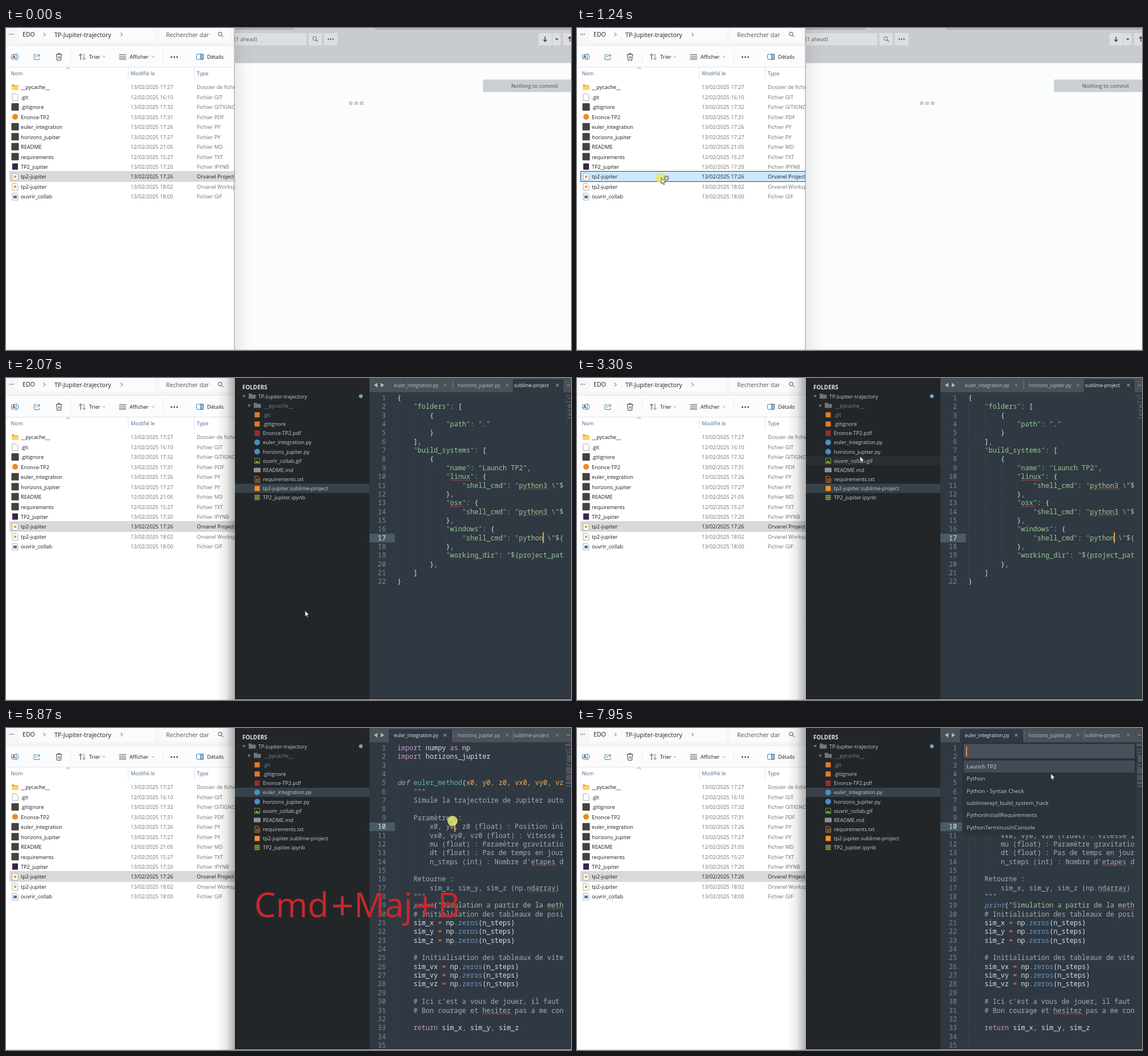
Recreate the animation shown at these times as an HTML page. Size 992 by 565 pixels, loop 8 s.

```html
<!DOCTYPE html>
<html lang="fr">
<head>
<meta charset="utf-8">
<title>TP-Jupiter</title>
<style>
html, body { margin: 0; width: 100%; height: 100%; overflow: hidden; background: #fff; }
svg { display: block; width: 992px; height: 565px; }
text { font-family: "Open Sans", sans-serif; font-size: 9.2px; white-space: pre; }
.mono { font-family: "Noto Sans Mono", monospace; font-size: 11.87px; }
</style>
</head>
<body>
<svg id="stage" viewBox="0 0 992 565" xmlns="http://www.w3.org/2000/svg"></svg>
<script>
const LOOP = 8000, STEP = 82.7;
const COL = 7.125, LINE = 15.35, CODE_X = 687;
const ROW = 17.45, SIDE = 16.15;

const rect = (x, y, w, h, fill, extra = '') =>
  `<rect x="${x}" y="${y}" width="${w}" height="${h}" fill="${fill}" ${extra}/>`;
const text = (x, y, s, fill = '#1b1b1b', extra = '') =>
  `<text x="${x}" y="${y}" fill="${fill}" ${extra}>${s}</text>`;
const line = (d, stroke = '#444', w = 1, extra = '') =>
  `<path d="${d}" fill="none" stroke="${stroke}" stroke-width="${w}" ${extra}/>`;
const shape = (d, fill, extra = '') => `<path d="${d}" fill="${fill}" ${extra}/>`;
const disc = (x, y, r, fill, extra = '') => `<circle cx="${x}" cy="${y}" r="${r}" fill="${fill}" ${extra}/>`;
const group = (id, body, extra = '') => `<g id="${id}" ${extra}>${body}</g>`;
const size = n => `style="font-size:${n}px"`;
const dots = (x, y, gap, fill, r = 1.1) => [0, 1, 2].map(i => disc(x + i * gap, y, r, fill)).join('');
const page = (x, y, inner = '') =>
  shape(`M${x} ${y}h7l3 3v9h-10z`, '#fff', 'stroke="#9a9a9a" stroke-width=".8"') + inner;

// File explorer
const FILES = [
  ['dir', '__pycache__', '13/02/2025 17:27', 'Dossier de fichiers'],
  ['page', '.git', '12/02/2025 16:10', 'Fichier GIT'],
  ['tile', '.gitignore', '13/02/2025 17:32', 'Fichier GITIGNORE'],
  ['pdf', 'Enonce-TP2', '13/02/2025 17:31', 'Fichier PDF'],
  ['tile', 'euler_integration', '13/02/2025 17:26', 'Fichier PY'],
  ['tile', 'horizons_jupiter', '13/02/2025 17:27', 'Fichier PY'],
  ['tile', 'README', '12/02/2025 21:05', 'Fichier MD'],
  ['tile', 'requirements', '12/02/2025 15:27', 'Fichier TXT'],
  ['web', 'TP2_jupiter', '13/02/2025 17:20', 'Fichier IPYNB'],
  ['proj', 'tp2-jupiter', '13/02/2025 17:26', 'Orvanel Project'],
  ['proj', 'tp2-jupiter', '13/02/2025 18:02', 'Orvanel Workspace'],
  ['img', 'ouvrir_collab', '13/02/2025 18:00', 'Fichier GIF']
];
const PICKED = 9;
const fileIcon = {
  dir: y => shape(`M10 ${y - 5}h4l1.500 1.500h6v8h-11.500z`, '#f0a92c') + rect(10, y - 2, 11.5, 6, '#ffd266'),
  page: y => page(11, y - 6),
  tile: y => rect(9.5, y - 7, 13, 13, '#44413f', 'rx="1"'),
  pdf: y => disc(16, y - .5, 5, '#ee8a1d'),
  web: y => rect(11, y - 6, 10, 11, '#35264f'),
  proj: y => page(11, y - 6, rect(14, y - 2, 4, 4, '#f0982d')),
  img: y => page(11, y - 6, rect(13, y - 2, 6, 5, '#3d7dbd'))
};

function explorer() {
  let s = rect(0, 0, 402, 565, '#fff') + rect(0, 0, 402, 30, '#f6f6f6') +
    rect(22, 0, 240, 24, '#fbfbfb') + rect(269, 0, 124, 24, '#fbfbfb') +
    rect(0, 30, 402, 38, '#fcfcfc') + rect(0, 30, 402, 1, '#e6e6e6') + rect(0, 68, 402, 1, '#e2e2e2');
  s += dots(6.5, 11, 3.2, '#222', .8) + text(29, 15, 'EDO', '#222', size(10.6)) +
    text(85, 15.5, 'TP-Jupiter-trajectory', '#222', size(10.7)) +
    text(281, 15.5, 'Rechercher dar', '#555', size(10.6));
  s += [67, 202.5].map(x => line(`M${x - 1} 8.500l3 3l-3 3`)).join('');
  s += disc(376, 10.5, 3.2, 'none', 'stroke="#444"') + line('M378.500 13l3 3');
  // Toolbar
  s += line('M17 46.500h-5.500q-2 0-2 2v4q0 2 2 2h5.500M19 46.500q2.500 0 2.500 2v4q0 2-2.500 2M18 44v13', '#3e7eae') +
    line('M11.500 53l2.200-5.500l2.200 5.500M12.300 51.300h3', '#333');
  s += line('M53 46.500h-3q-1 0-1 1v7q0 1 1 1h8q1 0 1-1v-2M52 52q1-4 4-4h3M56.500 45.500l3.500 2.700l-3.500 3', '#3e7eae');
  s += line('M87.500 46.500h11M91 46v-1.500h4v1.500M88.500 47l1 9.500h7l1-9.500M92 49.500v4.500M94.500 49.500v4.500');
  s += line('M131 56v-10.500M128 48.500l3-3l3 3', '#333') + line('M137 45v10.500M134 52.500l3 3l3-3', '#3e7eae');
  s += [46.5, 49.5, 52.500, 55].map(y => rect(198.5, y - .5, 12.5, 1, '#555')).join('');
  s += text(146, 54, 'Trier') + text(217, 54, 'Afficher') + text(353, 54, 'Détails');
  s += [172, 258].map(x => line(`M${x - 2} 49.500l2 2l2-2`, '#777', .9)).join('') + dots(290.5, 51, 5, '#222', 1.3);
  s += rect(334.500, 46, 12, 9, 'none', 'rx="1.500" stroke="#3e7eae"') + rect(341.500, 46, 5, 9, '#8fc0e4', 'stroke="#3e7eae"');
  s += rect(114, 38, 1, 25, '#eee') + rect(275, 38, 1, 25, '#eee');
  // Columns
  s += text(8.5, 83, 'Nom', '#4a6a8e') + text(219, 83, 'Modifié le', '#4a6a8e') + text(335, 83, 'Type', '#4a6a8e') +
    line('M106 72l3-2.500l3 2.500', '#777', .9) + rect(214, 69, 1, 21, '#e3e3e3') + rect(330, 69, 1, 21, '#e3e3e3');
  s += '<rect id="hover" x="6" width="396" height="17.400" fill="#e5f3ff"/><rect id="picked" x="6.500" y="251.500" width="400" height="18"/>';
  FILES.forEach(([icon, name, date, kind], i) => {
    const y = 104 + i * ROW, meta = i === PICKED ? '#1b1b1b' : '#707070';
    s += fileIcon[icon](y) + text(26, y + 3.4, name) + text(219, y + 3.4, date, meta) + text(335, y + 3.4, kind, meta);
  });
  return s + rect(0, 564, 402, 1, '#d5d5d5');
}

// Window behind, seen before the editor opens
function backWindow() {
  const button = (x, w) => rect(x, 9, w, 21.5, '#dcdee0', 'rx="1"');
  return rect(402, 0, 590, 565, '#fbfdfc') + rect(402, 0, 590, 61.500, '#c8cbcf') +
    rect(402, 0, 104, 3, '#a9b0b8') + rect(648, 0, 344, 3, '#a9b0b8') +
    button(402, 125.5) + button(531, 23.5) + button(558, 24) + button(935, 23.5) + button(959.5, 14.5) + button(978, 14) +
    text(401, 22.5, '(1 ahead)', '#565a5f') +
    disc(542, 18.5, 3.2, 'none', 'stroke="#666"') + line('M544.500 21l3 3', '#666', 1.3) + dots(566, 19.5, 4, '#555', 1.2) +
    line('M946.500 15v8M943.500 20.500l3 3l3-3', '#333', 1.4) + shape('M964 18.500h6l-3 3z', '#444') +
    line('M990 24v-8M987 18.500l3-3l3 3', '#333', 1.4) +
    rect(837.5, 90.5, 154.5, 22, '#cacfd5') + text(928, 105, 'Nothing to commit', '#484c50', 'text-anchor="middle" style="font-size:9.350px"') +
    [602, 611.5, 621].map(x => rect(x, 129, 6.500, 6, '#c9cccf', 'rx="1"')).join('') +
    rect(402, 0, 34, 565, 'url(#shadeR)') + rect(400.500, 0, 1, 565, '#898d91') + rect(402, 564, 590, 1, '#ccc');
}

// Editor sidebar
const TREE = [['dir', 'TP-Jupiter-trajectory'], ['dir', '__pycache__'], ['git', '.git'], ['git', '.gitignore'],
  ['pdf', 'Enonce-TP2.pdf'], ['py', 'euler_integration.py'], ['py', 'horizons_jupiter.py'],
  ['gif', 'ouvrir_collab.gif'], ['md', 'README.md'], ['txt', 'requirements.txt'],
  ['proj', 'tp2-jupiter.sublime-project'], ['db', 'TP2_jupiter.ipynb']];
const sideIcon = {
  dir: (x, y) => shape(`M${x - 6} ${y - 5}h5l1.500 2h6v7h-12.500z`, '#70767b'),
  git: (x, y) => rect(x - 4.5, y - 4.5, 9, 9, '#e07a2c'),
  pdf: (x, y) => rect(x - 4.500, y - 5, 9, 10, '#8e2f35'),
  py: (x, y) => disc(x, y, 5, '#4a8fc0'),
  gif: (x, y) => rect(x - 4.500, y - 4.500, 9, 9, 'none', 'stroke="#6f9137"') + shape(`M${x - 4} ${y + 4}l3-5l2.500 3l1.500-1l1.500 3z`, '#7fa43e'),
  md: (x, y) => rect(x - 6, y - 4, 12, 8, '#8c9196', 'rx="1"'),
  txt: (x, y) => line(`M${x - 4} ${y - 5}h5.500l3 3v7.500h-8.500zM${x - 2} ${y - .5}h5M${x - 2} ${y + 1.500}h5M${x - 2} ${y + 3.500}h5`, '#d9822f'),
  proj: (x, y) => rect(x - 4.500, y - 4.500, 9, 9, '#f0922b'),
  db: (x, y) => [-5, -1.7, 1.6].map(d => rect(x - 5, y + d, 10, 2.700, '#7d8c33', 'rx="1.300"')).join('')
};

function sidebar() {
  let s = rect(402, 0, 236, 565, '#222629') + rect(402, 0, 1, 565, '#171a1c') +
    '<rect id="sideHover" x="402" width="236" height="16" fill="#2a2e32"/><rect id="sidePick" x="402" width="236" height="16.200" fill="#37424a"/>' +
    text(415, 20, 'FOLDERS', '#dfe3e6', 'style="font-size:9.900px;font-weight:700"');
  TREE.forEach(([icon, name], i) => {
    const y = 32.3 + i * SIDE, dim = i === 1 || i === 2;
    s += sideIcon[icon](i ? 441 : 432, y) + text(i === 0 ? 443 : i === 1 ? 453 : 451, y + 3.3, name, dim ? '#7b8186' : '#c8ccd0');
  });
  return s + shape('M415 30h6l-3 4.500z', '#6d7378') + shape('M425.500 45v6.500l4.500-3.200z', '#6d7378') + disc(623, 32, 3.3, '#6ba7cd');
}

// Code
const PROJECT = `{
    "folders": [
        {
            "path": "."
        }
    ],
    "build_systems": [
        {
            "name": "Launch TP2",
            "linux": {
                "shell_cmd": "python3 \\"$
            },
            "osx": {
                "shell_cmd": "python3 \\"$
            },
            "windows": {
                "shell_cmd": "python \\"\${
            },
            "working_dir": "\${project_path
        },
    ]
}`.split('\n');

const zeros = p => 'xyz'.split('').map(a => `    sim_${p}${a} = np.zeros(n_steps)`).join('\n');
const PYTHON = `import numpy as np
import horizons_jupiter


def euler_method(x0, y0, z0, vx0, vy0, vz0
    """
    Simule la trajectoire de Jupiter autour

    Paramètres :
        x0, y0, z0 (float) : Position initiale
        vx0, vy0, vz0 (float) : Vitesse initiale
        mu (float) : Paramètre gravitationnel
        dt (float) : Pas de temps en jours
        n_steps (int) : Nombre d'etapes de

    Retourne :
        sim_x, sim_y, sim_z (np.ndarray)
    """
    print("Simulation a partir de la methode
    # Initialisation des tableaux de position
${zeros('')}

    # Initialisation des tableaux de vitesse
${zeros('v')}

    # Ici c'est a vous de jouer, il faut
    # Bon courage et hesitez pas a me contacter

    return sim_x, sim_y, sim_z

`.split('\n');

const INK = { plain: '#d8dee9', grey: '#a6acb9', green: '#99c794', teal: '#5fb4b4', pink: '#c695c6', orange: '#f9ae58', red: '#f97b58', blue: '#6699cc' };
const span = (s, ink, extra = '') => `<tspan fill="${INK[ink]}" ${extra}>${s}</tspan>`;
const paint = (s, rules) => s.replace(new RegExp(rules.map(r => `(${r[0]})`).join('|'), 'g'), (m, ...g) => {
  const [, ink, extra] = rules[g.findIndex((v, i) => i < rules.length && v !== undefined)];
  return span(m, ink, extra);
});
const ITALIC = 'font-style="italic"';
const JSON_RULES = [['\\\\"', 'pink'], ['"', 'teal'], ['\\$\\{?|[\\w.]+', 'green'], ['[:,]', 'grey'], ['[{}\\[\\]]', 'plain']];
const PY_RULES = [['"[^"]*$', 'green'], ['\\bdef\\b', 'pink', ITALIC], ['\\bprint\\b', 'blue', ITALIC], ['\\b(?:import|as|return)\\b', 'pink'],
  ['\\bzeros\\b', 'blue'], ['euler_method', 'teal'], ['\\bv?[xyz]0?\\b', 'orange'], ['=', 'red'], ['[.,]', 'grey']];
const paintPy = (s, i) => i > 4 && i < 18 || /^ *#/.test(s) ? span(s, 'grey') : paint(s, PY_RULES);
const TYPOS = /linux|python3|osx|etapes|ndarray|meth(?=o?d?e?$)|hesitez/;

function code(lines, paintLine) {
  let s = '', depth = 0, guides = '', waves = '';
  lines.forEach((raw, i) => {
    const src = raw.slice(0, 41), y = 39 + i * LINE;
    if (src) depth = src.search(/\S/);
    for (let c = 0; c < depth; c += 4) guides += `M${CODE_X + c * COL + .5} ${y - 12}v${LINE}`;
    const typo = TYPOS.exec(src);
    if (typo) {
      waves += `M${CODE_X + typo.index * COL} ${y + 3}`;
      for (let k = 0; k < typo[0].length * COL / 4; k++) waves += 'l2-1.500l2 1.500';
    }
    s += text(667, y, i + 1, '#7f8790', 'class="mono" text-anchor="end"') +
      text(CODE_X, y, paintLine(src, i), INK.plain, 'class="mono" clip-path="url(#codeClip)"');
  });
  // Minimap strokes follow the length of each line
  const map = lines.map((l, i) => {
    const x = 982 + l.search(/\S|$/) * .35;
    return l && x < 992 ? rect(x, 28 + i * 2.3, Math.min(992 - x, l.trim().length * .5), 1, '#717982') : '';
  }).join('');
  return line(guides, '#4b535c', .8, 'stroke-dasharray="1 1.500"') + s +
    line(waves, '#cf5058', .8, 'clip-path="url(#codeClip)"') + map;
}

const TABS = [[672, 112, 681, 'euler_integration.py', 771], [784, 106, 793, 'horizons_jupiter.py', 880], [890, 89, 892, 'sublime-project', 968]];
const tabs = active => rect(638, 0, 354, 25, '#4a5158') +
  shape('M646 12.500l6-4v8zM664 12.500l-6-4v8z', '#b4b9be') +
  TABS.map(([x, w, tx, name, cx], i) => {
    const on = i === active;
    return (on ? shape(`M${x} 25V6q0-4 4-4h${w - 8}q4 0 4 4v19z`, '#303841') : i ? rect(x, 5, 1, 15, '#747b82') : '') +
      text(tx, 15.700, name, on ? '#e4e8ec' : '#bcc2c8', size(8.4)) +
      line(`M${cx - 2.500} 10l5 5M${cx + 2.500} 10l-5 5`, on ? '#c9ced3' : '#92999f', 1);
  }).join('') + rect(985, 12, 5, 1, '#a6acb2');

const MENU = ['Launch TP2', 'Python', 'Python - Syntax Check', 'sublimerepl_build_system_hack', 'PythonInstallRequirements', 'PythonTerminusInConsole'];
const panel = () => rect(676, 26, 306, 162, '#2c3239') + rect(679, 28, 300, 25, '#48515b') + rect(679, 57, 300, 21, '#434b55') +
  rect(683, 32, 1.8, 18, '#e8944a') +
  MENU.map((m, i) => text(684, 71 + i * 21.35, m, i ? '#c3c8ce' : '#d3d8dd', size(9.8))).join('');

const big = (x, y, s, n, anchor = 'start') => text(x, y, s, '#c9282b', `text-anchor="${anchor}" ${size(n)}`);
const caption = big(436, 332, 'Cmd', 60) + big(590.5, 337, '+', 70, 'middle') + big(611, 332, 'Maj', 60) +
  big(736, 337, '+', 70, 'middle') + big(758, 332, 'B', 60);

const shade = (id, ...alphas) => `<linearGradient id="${id}">${alphas.map((a, i) =>
  `<stop offset="${i / (alphas.length - 1)}" stop-opacity="${a}"/>`).join('')}</linearGradient>`;

document.getElementById('stage').innerHTML =
  `<defs>${shade('shadeR', .07, .02, 0)}${shade('shadeL', 0, .08, .32)}<clipPath id="codeClip"><rect x="680" y="25" width="298" height="540"/></clipPath></defs>` +
  explorer() + group('back', backWindow()) +
  group('editor',
    rect(370, 0, 32, 565, 'url(#shadeL)') + sidebar() + rect(638, 0, 354, 565, '#303841') +
    '<rect id="gutter" x="638" width="45" height="15.300" fill="#4a5a66"/>' +
    group('project', code(PROJECT, s => paint(s, JSON_RULES)) + tabs(2)) +
    group('python', code(PYTHON, paintPy) + tabs(0)) +
    '<text id="lineNo" class="mono" x="667" text-anchor="end" fill="#d8dee9"></text>' +
    '<rect id="caret" width="1.800" height="19" fill="#f9ae58"/>' +
    group('menu', panel()) + rect(402, 564, 590, 1, '#c4c8cb')) +
  group('caption', caption) +
  group('pointer',
    disc(-1, 0, 9, '#e4e96a', 'id="click" opacity=".85"') +
    shape('M0 0V10.500L2.400 8.300L4 12L5.600 11.300L4.100 7.700H7.300Z', '#fff', 'id="arrow" stroke="#222" stroke-width=".8"') +
    group('beam', line('M-2.500-5.500h2l.5.500l.5-.500h2M0-5v10M-2.500 5.500h2l.5-.500l.5.500h2', '#cfd4d9')) +
    disc(9, .5, 3.5, '#d4d4d4', 'id="busy" stroke="#858585" stroke-width="2"'));

const el = id => document.getElementById(id);
const set = (id, attrs) => { for (const k in attrs) el(id).setAttribute(k, attrs[k]); };
const show = (id, on) => set(id, { visibility: on ? 'inherit' : 'hidden' });

// Pointer moves: [start, end, points...]
const MOVES = [
  [80, 720, [849, 522], [148, 263]],
  [1320, 1900, [833, 341], [525, 400]],
  [1970, 2060, [525, 400], [525, 408]],
  [2650, 3300, [525, 408], [546, 290], [497, 137.5]],
  [3300, 3460, [497, 137.5], [495, 115]],
  [3460, 3630, [495, 115], [491, 115.5]],
  [4960, 5780, [491, 115.5], [785, 163]],
  [7770, 7935, [876, 152], [832, 80]]
];

function pointerAt(t) {
  const [a, b, p, q, r] = MOVES.filter(m => m[0] <= t).pop() || MOVES[0];
  const u = Math.max(0, Math.min(1, (t - a) / (b - a)));
  const k = u * u * (3 - 2 * u);
  return [0, 1].map(i => r
    ? (1 - k) ** 2 * p[i] + 2 * k * (1 - k) * q[i] + k * k * r[i]
    : p[i] + (q[i] - p[i]) * k);
}

function draw(t) {
  const within = (a, b = Infinity) => t >= a - 5 && t < b - 5;
  const open = within(1320), py = within(4140), menu = within(6950);
  const [x, y] = pointerAt(Math.floor((t + 15) / STEP) * STEP);
  const seen = within(80, 6950) || within(7790);

  show('back', !open);
  show('editor', open);
  show('project', open && !py);
  show('python', py);
  show('menu', menu);

  const fileRow = Math.floor((y - 95.2) / ROW), overFile = seen && !open && x < 400 && fileRow >= 0 && fileRow < 12;
  const pickHot = overFile && fileRow === PICKED, focused = within(1150, 1320);
  show('hover', overFile && !pickHot);
  set('hover', { y: 95.2 + fileRow * ROW });
  const pickFill = pickHot ? '#cce8ff' : '#d9d9d9';
  set('picked', { fill: pickFill, stroke: focused ? '#3a4650' : pickFill });

  const sideRow = Math.floor((y - 24) / SIDE);
  show('sideHover', open && seen && x > 402 && x < 638 && sideRow >= 0 && sideRow < 12);
  set('sideHover', { y: 24 + sideRow * SIDE });
  set('sidePick', { y: 24 + (py ? 5 : 10) * SIDE });

  const lineNo = within(5870) ? 10 : 17, base = 39 + (lineNo - 1) * LINE;
  set('gutter', { y: base - 11.5 });
  set('lineNo', { y: base });
  el('lineNo').textContent = lineNo;
  show('caret', open && !menu);
  set('caret', { x: lineNo === 10 ? 787 : py ? 956.500 : 942.500, y: base - 14 });

  show('caption', within(4550, 7620));
  set('caption', { opacity: t < 7195 ? 1 : t < 7275 ? .7 : .4 });

  const beam = open && x > 638 && !menu;
  show('pointer', seen);
  show('arrow', seen && !beam);
  show('beam', seen && beam);
  show('busy', within(1240, 1320));
  show('click', focused || within(4140, 4310) || within(5870, 6110));
  set('pointer', { transform: `translate(${x.toFixed(1)} ${y.toFixed(1)})` });
}

function tick() {
  draw(performance.now() % LOOP);
  requestAnimationFrame(tick);
}
tick();
</script>
</body>
</html>
```
